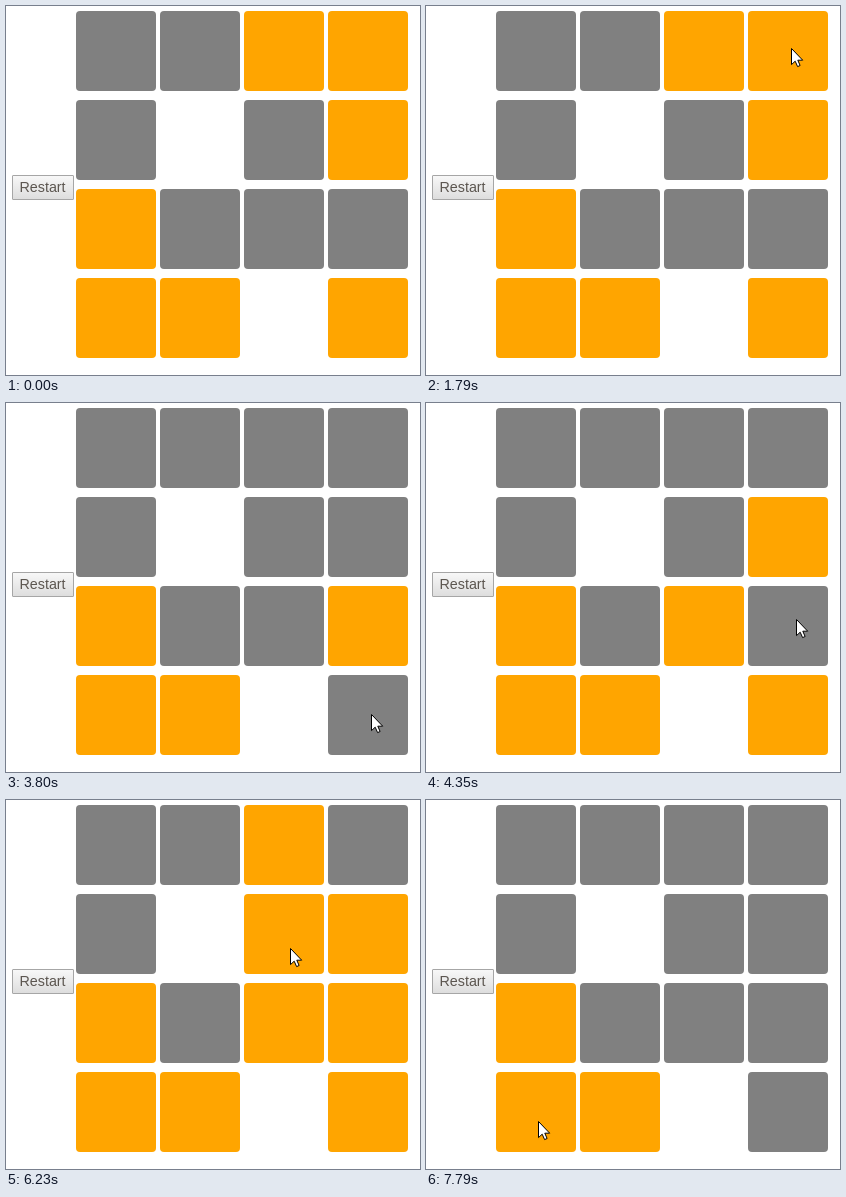
These frames come from a looping animation (414 px wide and 369 px high, 8 s). An HTML page:

```html
<!DOCTYPE html>
<html lang="en">
<head>
<meta charset="utf-8">
<title>Tile puzzle</title>
<style>
  html, body { margin: 0; width: 100%; height: 100%; overflow: hidden; background: #fff; }
  svg { display: block; }
  .tile { fill: #808080; }
  .tile.lit { fill: #ffa500; }
  .button rect { fill: url(#face); stroke: #a6a6a6; }
  .button text { font: 14.3px "Liberation Sans", Arial, sans-serif; fill: #5c5650; }
  .button.hover rect { fill: url(#faceHover); stroke: #707070; }
  .pointer { fill: #fff; stroke: #000; stroke-linejoin: round; }
</style>
</head>
<body>
<svg width="414" height="369" viewBox="0 0 414 369">
  <defs>
    <linearGradient id="face" x2="0" y2="1">
      <stop stop-color="#f8f8f8"/><stop offset="1" stop-color="#dddddd"/>
    </linearGradient>
    <linearGradient id="faceHover" x2="0" y2="1">
      <stop stop-color="#f9f9f9"/><stop offset="1" stop-color="#dedede"/>
    </linearGradient>
  </defs>
  <g id="board"></g>
  <g id="button" class="button">
    <rect x="6.5" y="169.5" width="61" height="24" rx=".5"/>
    <text x="13.5" y="186">Restart</text>
  </g>
  <g id="cursor" class="pointer">
    <path id="arrow" d="M.5.5V16.6L4.2 13.2 6.6 18.6 9.1 17.5 6.8 12.2H11.7Z"/>
    <g id="hand" transform="translate(-7)">
      <path d="M5.2 2.3a1.8 1.8 0 0 1 3.6 0V8q3.2-1.2 3.4 1 2.9-.9 3.2 1.1 2.3-.4 2.3 1.9v4.5q0 2-1.6 4v3H7V21Q3.2 16.4 1 13q-1-2.4 1-2.6 1.6 0 3.2 2.6Z"/>
      <path d="M8.8 8v4M12.2 9v3M15.4 10v2" fill="none"/>
    </g>
  </g>
</svg>
<script>
const LOOP = 8000;
const START = ["0011", "0.01", "1000", "11.1"];

// time, column, row
const CLICKS = [
  [2780, 3, 0], [3800, 3, 3], [4270, 3, 2], [4970, 3, 1],
  [5440, 3, 0], [6380, 2, 1], [7260, 3, 3]
];

// Stepped pointer moves through evenly timed waypoints
const MOVES = [
  { from: 440, to: 1060, steps: 9, path: [[1, 291], [14, 230], [37, 184]] },
  { from: 1150, to: 1230, steps: 2, path: [[170, 205], [340, 221]] },
  { from: 1320, to: 1790, steps: 7, path: [[372, 205], [402, 145], [365, 42]] },
  { from: 2780, to: 3250, steps: 7, path: [[365, 42], [371, 180], [365, 311]] },
  { from: 3800, to: 4120, steps: 5, path: [[365, 311], [370, 222]] },
  { from: 4270, to: 4740, steps: 7, path: [[370, 222], [374, 137]] },
  { from: 4970, to: 5290, steps: 5, path: [[374, 137], [362, 48]] },
  { from: 5440, to: 5850, steps: 6, path: [[362, 48], [312, 165], [280, 231], [277, 199]] },
  { from: 6080, to: 6230, steps: 3, path: [[279, 180], [284, 148]] },
  { from: 6380, to: 6550, steps: 3, path: [[284, 148], [290, 226]] },
  { from: 6790, to: 7110, steps: 5, path: [[312, 262], [398, 338], [382, 342]] },
  { from: 7260, to: 7790, steps: 8, path: [[382, 342], [240, 331], [112, 321]] }
];

const $ = id => document.getElementById(id);
const [board, button, cursor, arrow, hand] =
  ["board", "button", "cursor", "arrow", "hand"].map($);

const tiles = [];
START.forEach((line, row) => [...line].forEach((mark, col) => {
  if (mark === ".") return;
  const rect = document.createElementNS("http://www.w3.org/2000/svg", "rect");
  const box = { x: 70 + 84 * col, y: 5 + 89 * row, width: 80, height: 80, rx: 4 };
  for (const name in box) rect.setAttribute(name, box[name]);
  board.append(rect);
  tiles.push({ rect, col, row, lit: mark === "1" });
}));

function isLit(tile, time) {
  const flips = CLICKS.filter(([at, col, row]) =>
    at <= time && Math.abs(col - tile.col) + Math.abs(row - tile.row) <= 1);
  return tile.lit !== (flips.length % 2 === 1);
}

function pointerAt(time) {
  const move = MOVES.findLast(m => m.from <= time);
  if (!move) return null;
  const { from, to, steps, path } = move;
  const step = Math.floor((time - from) / (to - from) * (steps - 1) + 0.1);
  const p = Math.min(1, step / (steps - 1));
  const along = p * p * (3 - 2 * p) * (path.length - 1);
  const i = Math.min(path.length - 2, Math.floor(along));
  return path[i].map((v, axis) => Math.round(v + (path[i + 1][axis] - v) * (along - i)));
}

const show = (node, visible) => node.setAttribute("visibility", visible ? "visible" : "hidden");

function draw(time) {
  for (const tile of tiles)
    tile.rect.setAttribute("class", isLit(tile, time) ? "tile lit" : "tile");

  const pos = pointerAt(time);
  const over = !!pos && pos[0] >= 6 && pos[0] < 68 && pos[1] >= 169 && pos[1] < 194;
  button.classList.toggle("hover", over);
  show(arrow, pos && !over);
  show(hand, over);
  if (pos) cursor.setAttribute("transform", `translate(${pos})`);
}

const begin = performance.now();
function tick() {
  draw((performance.now() - begin) % LOOP);
  requestAnimationFrame(tick);
}
tick();
</script>
</body>
</html>
```
